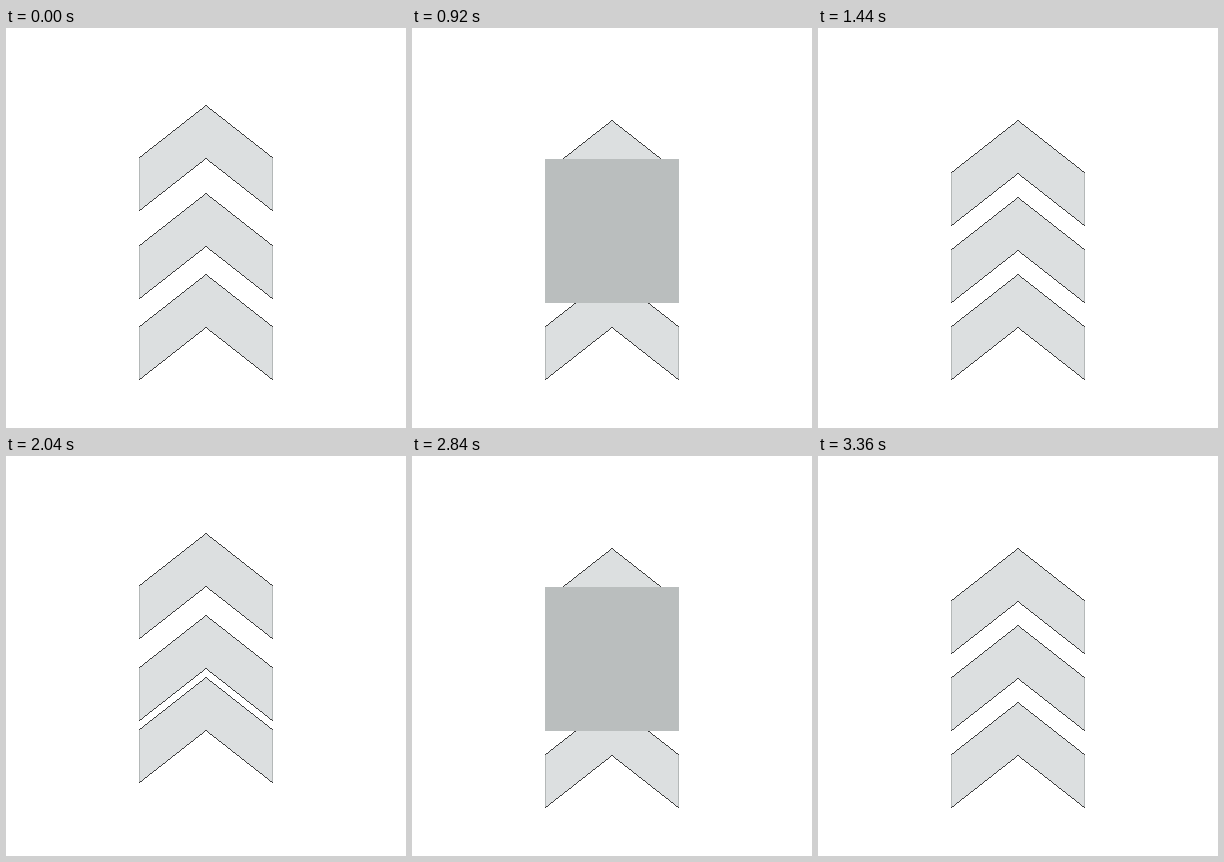
These frames come from a looping animation (400x400 px, 3840 ms). An HTML page:

```html
<!DOCTYPE html>
<html lang="en">
<head>
<meta charset="utf-8">
<title>Bouncing chevrons</title>
<style>
  html, body { margin: 0; width: 100%; height: 100%; overflow: hidden; background: #fff; }
  svg { display: block; width: 400px; height: 400px; }
  .fill { fill: #dcdfe0; }
  .side { fill: none; stroke: #b4b8b8; }
  .edge { fill: none; stroke: #111; stroke-width: .8; }
  #flash { fill: #babebe; visibility: hidden; }
</style>
</head>
<body>
<svg viewBox="0 0 400 400" shape-rendering="crispEdges">
  <defs>
    <g id="chevron">
      <path class="fill" d="M133 53L200 .5L267 53V106L200 53.5L133 106Z"/>
      <path class="side" d="M133.5 53V106M266.5 53V106"/>
      <path class="edge" d="M133 53L200 .5L267 53M133 106L200 53.5L267 106"/>
    </g>
  </defs>
  <use class="arrow" href="#chevron"/>
  <use class="arrow" href="#chevron"/>
  <use class="arrow" href="#chevron"/>
  <rect id="flash" x="133" y="131" width="134" height="144"/>
</svg>
<script>
  const LOOP = 3840, CYCLE = 960, STEP = 40, SETTLED = 520;
  const REBOUND = 0.65;
  const parts = [
    { top: 92, peak: 46, delay: 27, air: 146 },
    { top: 169, peak: 38, delay: 36, air: 133 },
    { top: 246, peak: 31, delay: 55, air: 146 }
  ];
  const arrows = document.querySelectorAll(".arrow");
  const flash = document.getElementById("flash");
  const start = performance.now();

  // Parabolic hops, each shorter and lower than the one before.
  function lift(phase, { peak, delay, air }) {
    let t = phase - delay;
    if (t < 0 || phase >= SETTLED) return 0;
    while (t > air && peak > 1) {
      t -= air;
      air *= REBOUND;
      peak *= REBOUND ** 2;
    }
    const u = Math.min(t / air, 1);
    return Math.round(4 * peak * u * (1 - u));
  }

  function draw(now) {
    const time = Math.max(0, now - start) % LOOP;
    const phase = Math.floor(((time + STEP) % CYCLE) / STEP) * STEP;
    parts.forEach((part, i) => {
      arrows[i].setAttribute("transform", `translate(0 ${part.top - lift(phase, part)})`);
    });
    const flashing = phase === 0 && time < LOOP - STEP;
    flash.style.visibility = flashing ? "visible" : "hidden";
    requestAnimationFrame(draw);
  }
  draw(start);
</script>
</body>
</html>
```
